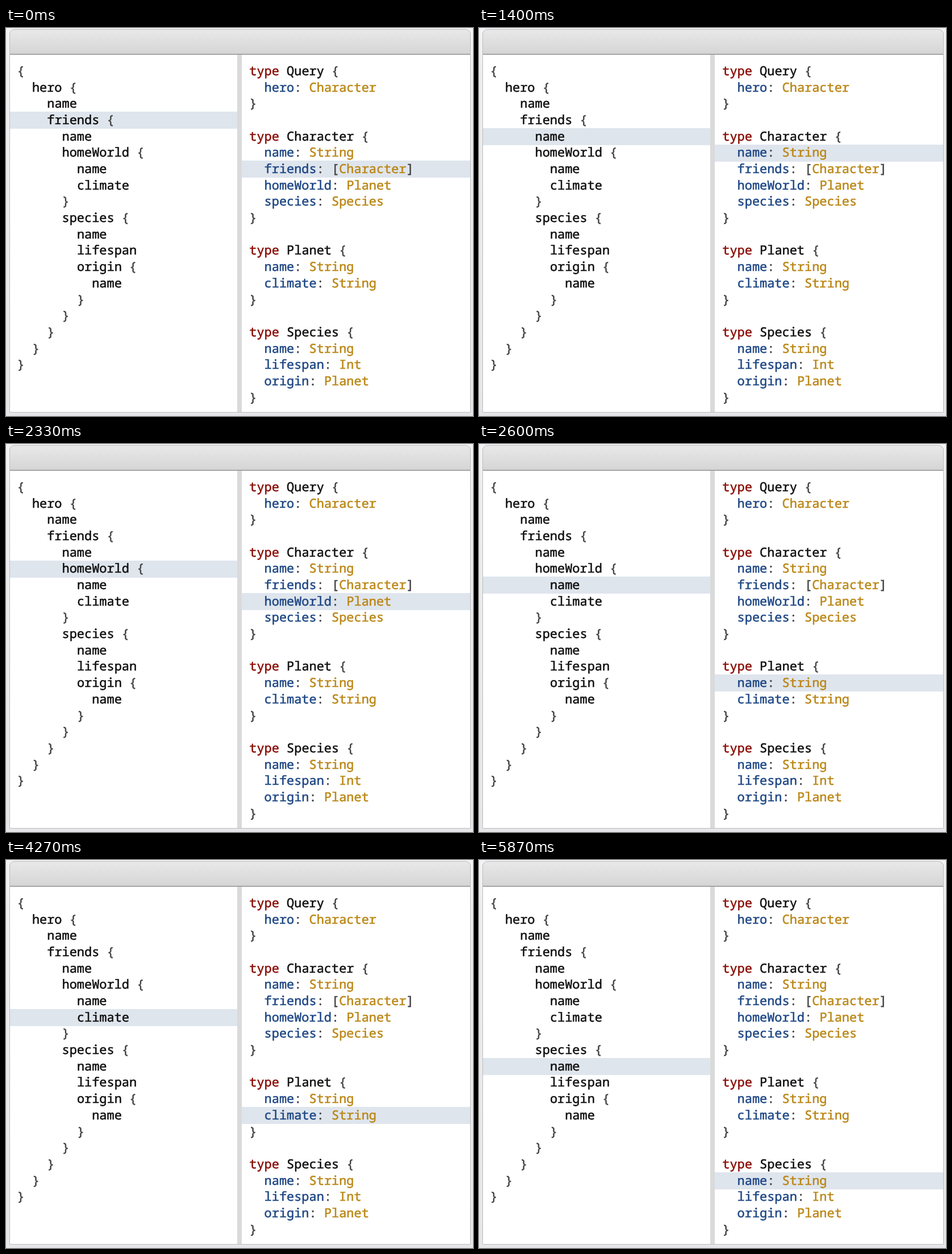
Write an HTML page that moves like this. It is 822 px wide and 682 px high and loops after 5.94 s.

```html
<!DOCTYPE html>
<html lang="en">
<head>
<meta charset="utf-8">
<title>Query and schema</title>
<style>
  html, body { margin: 0; width: 100%; height: 100%; overflow: hidden; background: #ededef; }
  svg { display: block; }
  text {
    font: 500 21.93px "Noto Sans Mono", "DejaVu Sans Mono", monospace;
    font-variant-ligatures: none;
    text-rendering: geometricPrecision;
    white-space: pre;
    fill: currentColor;
    stroke: currentColor;
    stroke-width: .55px;
  }
  .ink { color: #111; }
  .punct { color: #444; }
  .keyword { color: #8b0f08; }
  .field { color: #1f4885; }
  .type { color: #bb8716; }
</style>
</head>
<body>
<svg width="822" height="682" viewBox="0 0 822 682">
  <defs>
    <linearGradient id="outside" x2="0" y2="1">
      <stop offset="0" stop-color="#f3f3f5"/>
      <stop offset=".12" stop-color="#ededef"/>
      <stop offset="1" stop-color="#e6e6e8"/>
    </linearGradient>
    <linearGradient id="bar" x2="0" y2="1">
      <stop offset="0" stop-color="#e9e9e9"/>
      <stop offset="1" stop-color="#d5d5d5"/>
    </linearGradient>
  </defs>
  <rect width="822" height="682" fill="url(#outside)"/>
  <path d="M6 676V11a9 9 0 0 1 9-9H809a9 9 0 0 1 9 9V676z" fill="#fff"/>
  <path d="M6 46V11a9 9 0 0 1 9-9H809a9 9 0 0 1 9 9V46z" fill="url(#bar)"/>
  <rect x="6" y="45.6" width="812" height="1.4" fill="#8e8e8e"/>
  <rect id="leftMark" x="7" width="400" height="30" fill="#dfe5ed"/>
  <rect id="rightMark" x="415" width="402" height="30" fill="#dfe5ed"/>
  <rect x="407" y="47" width="8" height="629" fill="#dadada"/>
  <path d="M6.5 675.5V11a8.5 8.5 0 0 1 8.5-8.5H809a8.5 8.5 0 0 1 8.5 8.5V675.5z" fill="none" stroke="#bcbcbe"/>
  <g id="code"></g>
</svg>
<script>
const QUERY = `{
  hero {
    name
    friends {
      name
      homeWorld {
        name
        climate
      }
      species {
        name
        lifespan
        origin {
          name
        }
      }
    }
  }
}`;

const SCHEMA = `type Query {
  hero: Character
}

type Character {
  name: String
  friends: [Character]
  homeWorld: Planet
  species: Species
}

type Planet {
  name: String
  climate: String
}

type Species {
  name: String
  lifespan: Int
  origin: Planet
}`;

const LOOP = 5940;
const PITCH = 28.68;   // line height
const ADVANCE = 13.16; // character width

// [start in ms, query row, schema row]
const STEPS = [
  [0, 3, 6], [670, 4, 5], [1600, 5, 7], [2530, 6, 12],
  [3470, 7, 13], [4400, 9, 8], [5330, 10, 17]
];

const code = document.getElementById("code");
const leftMark = document.getElementById("leftMark");
const rightMark = document.getElementById("rightMark");

function schemaClass(word, line) {
  if (word === "type") return "keyword";
  if (line.startsWith("type")) return "ink";
  return /^[a-z]/.test(word) ? "field" : "type";
}

function addToken(word, cls, x, y) {
  const el = document.createElementNS("http://www.w3.org/2000/svg", "text");
  el.setAttribute("x", x.toFixed(2));
  el.setAttribute("y", y.toFixed(2));
  el.setAttribute("class", cls);
  el.textContent = word;
  code.append(el);
}

function addCode(listing, left, classify) {
  listing.split("\n").forEach((line, row) => {
    for (const m of line.matchAll(/\w+|[^\w\s]/g)) {
      const cls = /\w/.test(m[0]) ? classify(m[0], line) : "punct";
      addToken(m[0], cls, left + m.index * ADVANCE, 83 + row * PITCH);
    }
  });
}

const rowTop = row => Math.round(61.2 + row * PITCH);

function draw(now) {
  const t = now % LOOP;
  const [, left, right] = STEPS.findLast(step => step[0] <= t);
  leftMark.setAttribute("y", rowTop(left));
  rightMark.setAttribute("y", rowTop(right));
}

addCode(QUERY, 19.6, () => "ink");
addCode(SCHEMA, 428.3, schemaClass);

const start = performance.now();
function tick() {
  draw(performance.now() - start);
  requestAnimationFrame(tick);
}
tick();
</script>
</body>
</html>
```
